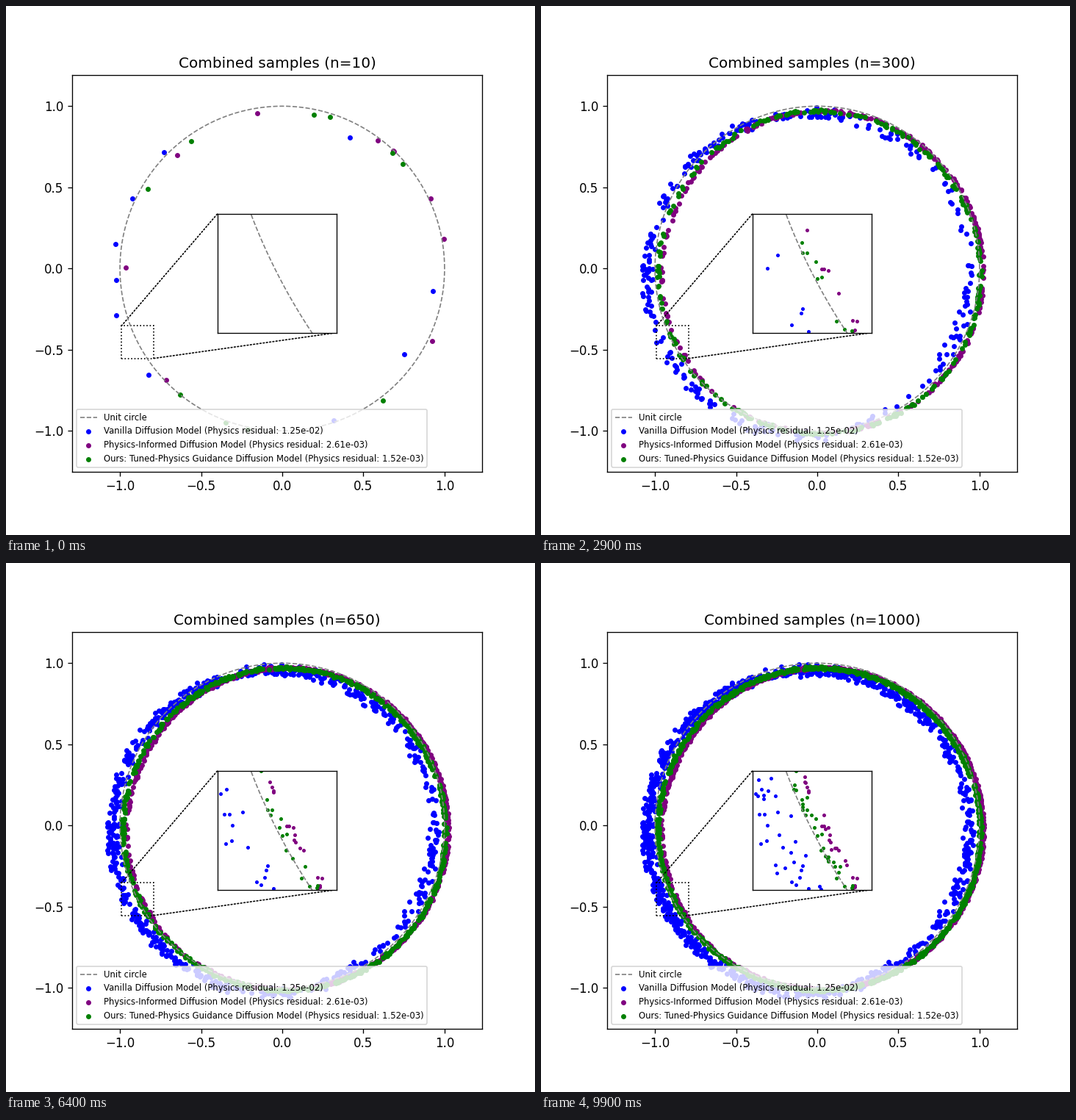
A matplotlib script that plays this animation: 720 by 720 pixels, repeating every 10000 ms.

```python
import numpy as np
import matplotlib.pyplot as plt
from matplotlib.animation import FuncAnimation
from matplotlib.patches import ConnectionPatch, Rectangle

TOTAL, STEP = 1000, 10
HALF = 0.1                      # half side of the magnified box
FOCUS = np.radians(207)         # its place on the circle


def ring(seed, mean, waves, noise, lean, peak):
    """Samples near a slightly warped circle, denser towards the peak angle."""
    rng = np.random.default_rng(seed)
    t = rng.uniform(0, 2 * np.pi, 4 * TOTAL)
    weight = 1 + lean * np.cos(t - np.radians(peak))
    t = t[rng.uniform(0, 1 + lean, t.size) < weight][:TOTAL]
    r = mean + noise * np.clip(rng.normal(size=TOTAL), -2.1, 2.1)
    for k, (a, b) in enumerate(waves, start=1):
        r += a * np.cos(k * t) + b * np.sin(k * t)
    return np.column_stack([r * np.cos(t), r * np.sin(t)])


vanilla = ring(4, 0.990, [(-.056, -.033), (.001, .004), (.003, .003)], .018, .45, 150)
informed = ring(11, 0.990, [(.0295, -.022), (-.001, .0025), (.003, -.003)], .004, .4, 25)
guided = ring(23, 0.9934, [(.012, -.0245), (0, -.001), (0, -.003)], .005, .3, 25)

SERIES = [
    (vanilla, "blue", "Vanilla Diffusion Model", "1.25e-02"),
    (informed, "purple", "Physics-Informed Diffusion Model", "2.61e-03"),
    (guided, "green", "Ours: Tuned-Physics Guidance Diffusion Model", "1.52e-03"),
]

fig, ax = plt.subplots(figsize=(6, 6), dpi=120)
ax.set_aspect("equal")
ax.set(xlim=(-1.2947, 1.2313), ylim=(-1.2511, 1.1935))
ticks = np.arange(-1, 1.1, 0.5)
ax.set_xticks(ticks)
ax.set_yticks(ticks)
title = ax.set_title("")

x0, y0 = np.cos(FOCUS) - HALF, np.sin(FOCUS) - HALF
x1, y1 = x0 + 2 * HALF, y0 + 2 * HALF
inset = fig.add_axes([0.4, 0.3825, 0.225, 0.225])
inset.set(xlim=(x0, x1), ylim=(y0, y1), xticks=[], yticks=[])

theta = np.linspace(0, 2 * np.pi, 400)
for a in (ax, inset):
    a.plot(np.cos(theta), np.sin(theta), "--", color="gray", lw=1,
           label="Unit circle", scalex=False, scaley=False)

layers = []
for pts, color, name, residual in SERIES:
    label = f"{name} (Physics residual: {residual})"
    main = ax.scatter([], [], s=10, color=color, label=label)
    small = inset.scatter([], [], s=4, color=color)
    layers.append((pts, main, small))

ax.legend(loc="lower left", fontsize=7)

ax.add_patch(Rectangle((x0, y0), 2 * HALF, 2 * HALF, fill=False, ec="black", ls=":", lw=1))
for data, corner in (((x0, y1), (0, 1)), ((x1, y0), (1, 0))):
    ax.add_artist(ConnectionPatch(data, corner, ax.transData, inset.transAxes,
                                  ec="black", ls=":", lw=1))


def update(frame):
    n = (frame + 1) * STEP
    title.set_text(f"Combined samples (n={n})")
    for pts, main, small in layers:
        main.set_offsets(pts[:n])
        small.set_offsets(pts[:n])


anim = FuncAnimation(fig, update, frames=TOTAL // STEP, interval=100,
                     repeat=True, repeat_delay=0, blit=False)
plt.show()
```
